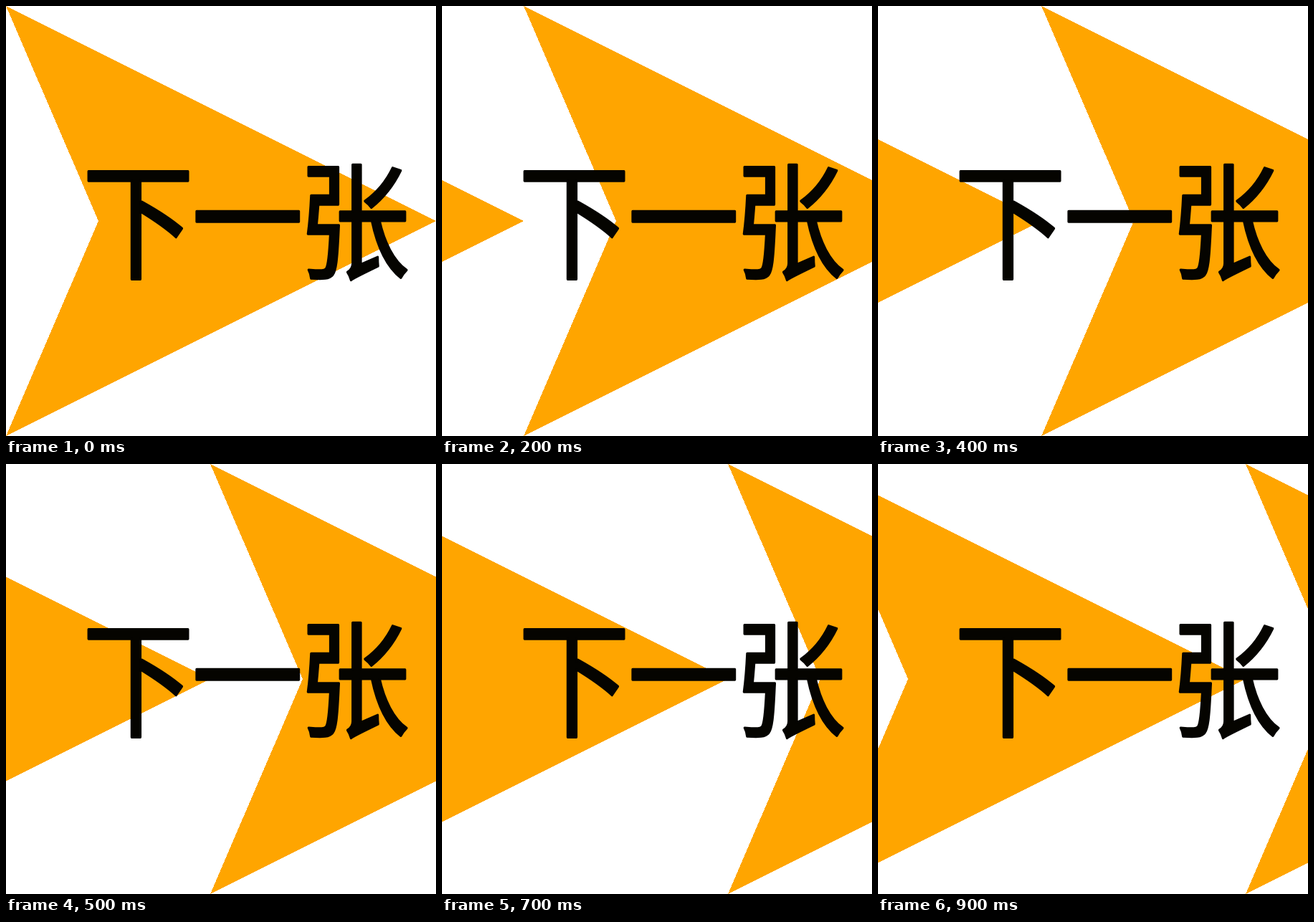
An HTML page that plays this animation: 600 by 600 pixels, repeating every 1000 ms.

```html
<!DOCTYPE html>
<html lang="zh-CN">
<head>
<meta charset="utf-8">
<title>下一张</title>
<style>
  html, body { margin: 0; width: 100%; height: 100%; overflow: hidden; background: #fff; }
  svg { display: block; width: 100vw; height: 100vh; }
  .arrows {
    fill: #ffa500;
    shape-rendering: crispEdges;
    animation: slide 1s steps(10) infinite;
  }
  @keyframes slide { to { transform: translateX(570px); } }
  text {
    font: 400 156px "Noto Sans CJK SC", "Noto Sans CJK", sans-serif;
    fill: #050400;
    stroke: #050400;
    stroke-width: 3px;
    stroke-linejoin: round;
  }
</style>
</head>
<body>
<svg viewBox="0 0 600 600">
  <defs>
    <path id="arrow" d="M0 0 600 300 0 600 129 300Z"/>
  </defs>
  <g class="arrows">
    <use href="#arrow"/>
    <use href="#arrow" x="-600"/>
  </g>
  <!-- tall letterforms -->
  <text transform="translate(107 366.5) scale(1 1.135)" x="-0.5 152 300.5" dy="0 -2.8 2.8">下一张</text>
</svg>
</body>
</html>
```
